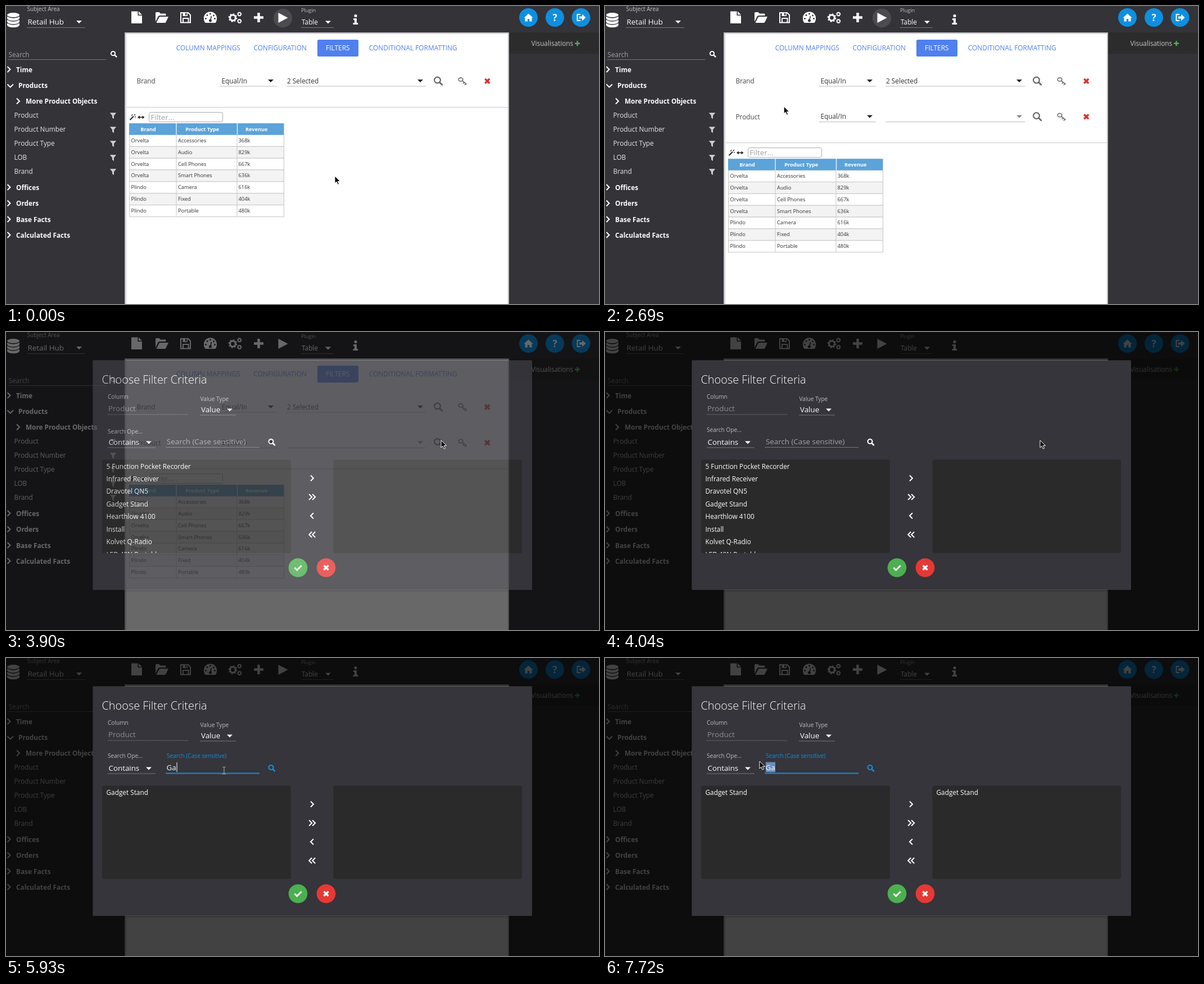
Animation, 1055 px wide and 531 px high, one loop 8000 ms. Source, as an HTML page:

```html
<!DOCTYPE html>
<html lang="en">
<head>
<meta charset="utf-8">
<title>Filter criteria</title>
<style>
html, body { margin: 0; width: 100%; height: 100%; overflow: hidden; background: #333338; }
svg { display: block; width: 100%; height: 100%; }
text { font-family: "Open Sans", sans-serif; white-space: pre; }
</style>
</head>
<body>
<svg id="stage" viewBox="0 0 1055 531" preserveAspectRatio="none"></svg>
<script>
const LOOP = 8000;
const DARK = '#333338', BLUE = '#0f8fe0', TAB = '#4f80ee', INK = '#333';

// Markup helpers
const text = (x, y, s, size = 11.8, fill = '#fff', extra = '') =>
  `<text x="${x}" y="${y}" font-size="${size}" fill="${fill}" ${extra}>${s}</text>`;
const bold = (x, y, s) => text(x, y, s, 11.8, '#fff', 'font-weight="700"');
const rect = (x, y, w, h, fill, extra = '') =>
  `<rect x="${x}" y="${y}" width="${w}" height="${h}" fill="${fill}" ${extra}/>`;
const circle = (x, y, r, fill, extra = '') =>
  `<circle cx="${x}" cy="${y}" r="${r}" fill="${fill}" ${extra}/>`;
const shape = (d, fill = '#fff', extra = '') => `<path d="${d}" fill="${fill}" ${extra}/>`;
const stroke = (d, color = '#fff', w = 2, extra = '') =>
  `<path d="${d}" fill="none" stroke="${color}" stroke-width="${w}" ${extra}/>`;
const rule = (x1, x2, y, color, extra) => stroke(`M${x1} ${y}H${x2}`, color, 1, extra);
const caret = (x, y, fill) => shape(`M${x - 5} ${y - 2.5}h10l-5 5z`, fill);
const lens = (x, y, r, color, w) =>
  circle(x - 1, y - 1, r, 'none', `stroke="${color}" stroke-width="${w}"`) +
  stroke(`M${x + r * .6} ${y + r * .6}l${r * .75} ${r * .75}`, color, w * 1.25, 'stroke-linecap="round"');
const cross = (x, y, r, color, w) =>
  stroke(`M${x - r} ${y - r}l${2 * r} ${2 * r}M${x + r} ${y - r}l${-2 * r} ${2 * r}`, color, w);
const chevron = (x, y, dir = 1, s = 5) =>
  stroke(`M${x - dir * s / 2} ${y - s}l${dir * s} ${s}l${-dir * s} ${s}`, '#fff', 2);
const gear = (x, y, r) =>
  circle(x, y, r, 'none', `stroke="#fff" stroke-width="${r * .62}"`) +
  circle(x, y, r * 1.4, 'none', `stroke="#fff" stroke-width="${r * .4}" stroke-dasharray="${r * .55}"`);

function toolbar() {
  const bands = [18.8, 24.8, 30.8].map(y =>
    shape(`M2 ${y}q11 6 22 0v3.5q-2 4-11 4t-11-4z`)).join('');
  const round = [929.5, 976.5, 1023].map(x => circle(x, 20.5, 16.5, BLUE)).join('');
  return `<ellipse cx="13" cy="16" rx="11" ry="4" fill="#fff"/>` + bands + round +
    text(37.5, 9, 'Subject Area', 10, '#c4c4c6') + text(38.5, 33, 'Retail Hub', 13.4) +
    caret(130, 28.5, '#fff') + rule(37, 141, 38.5, '#77777b') +
    shape('M223 9.5h11.5v7.5h7.5v14h-19zM236 9.5l6 6h-6z') +
    shape('M266 28V12.5q0-1.5 1.5-1.5h5l2.5 2.5h8q1.5 0 1.5 1.5v2h-11q-2 0-3 1.8z') +
    shape('M267.5 30l4.7-9.5q.7-1.5 2.3-1.5h14.5l-4.5 9.5q-.8 1.5-2.5 1.5z') +
    stroke('M311 12h13l4 4v13.5h-17zM315 29v-7h9.5v7') + rect(314.5, 11.5, 8.5, 6.5, '#fff') +
    rect(319, 12.5, 2.5, 4, DARK) +
    shape('M354.5 30q-3-4-2.5-9a11.5 10.7 0 0 1 23 0q.5 5-2.5 9z') +
    [[355.5, 22.5], [358, 16.5], [363.5, 14], [369.5, 17], [371.5, 22.5]]
      .map(([x, y]) => circle(x, y, 1.4, DARK)).join('') +
    stroke('M363.5 26l2-8', DARK, 1.6) + circle(363.5, 26, 2.5, DARK) +
    gear(403.5, 21, 4.9) + gear(415.3, 14.5, 2.6) + gear(415.3, 27, 2.6) +
    stroke('M449.5 12v17M441 20.5h17', '#fff', 4.5) +
    `<g id="playHalo">${circle(492.5, 21.5, 16.7, '#4c4c50')}</g>` +
    shape('M484.5 12l17 9-17 9z') +
    text(525, 10.5, 'Plugin', 9, '#c4c4c6') + text(526, 32.5, 'Table') +
    caret(573, 29, '#fff') + rule(525, 583, 38.5, '#77777b') +
    circle(622, 17.5, 2.6, '#fff') + shape('M618 22h6v8h2.2v3h-8.7v-3h2.5v-5h-2z') +
    shape('M921.5 21l8-7.5 8 7.5h-2v6.5h-4.3v-4.5h-3.4v4.5h-4.3v-6.5z') +
    text(976.5, 26.5, '?', 17, '#fff', 'font-weight="700" text-anchor="middle"') +
    stroke('M1022 15h-5.5v11h5.5', '#fff', 2) + shape('M1020 18.5h5v-4l6.5 6-6.5 6v-4h-5z');
}

function sidebar() {
  const fields = ['Product', 'Product Number', 'Product Type', 'LOB', 'Brand'];
  const groups = [['Time', 113], ['Offices', 323], ['Orders', 351.5], ['Base Facts', 380], ['Calculated Facts', 408]];
  return text(4.5, 90.5, 'Search', 11.8, '#a2a2a5') + rule(4, 178, 95.5, '#77777b') +
    lens(191.5, 85.5, 3.6, '#fff', 2) +
    groups.map(([s, y]) => chevron(5, y) + bold(18, y + 4.5, s)).join('') +
    stroke('M2.5 139.5l5.2 5.2 5.2-5.2') + bold(22, 146, 'Products') +
    chevron(21.5, 169.5) + bold(35, 174, 'More Product Objects') +
    fields.map((s, i) => text(14.5, 198.7 + 25 * i, s, 11.8, '#e8e8e8') +
      shape(`M184.8 ${190.3 + 25 * i}h11.4l-4.2 5v6l-3-2.3v-3.7z`, '#cfcfd0', `id="funnel${i}"`)).join('');
}

function filterRow(y, name, value) {
  return text(232.5, y + 4.5, name, 11.8, '#444') +
    text(383.5, y + 4, 'Equal/In', 11.8, INK) + caret(471, y, '#222') + rule(381, 482, y + 9.5, '#bbb') +
    text(500, y + 4, value, 11.8, INK) + caret(737, y, value ? '#222' : '#888') + rule(499, 747, y + 9.5, '#bbb') +
    lens(768.5, y - .5, 5.4, '#666', 2.2) +
    `<ellipse cx="809" cy="${y - 2.5}" rx="3.8" ry="3.2" fill="none" stroke="#777" stroke-width="1.8"/>` +
    stroke(`M811.5 ${y - .5}l8 6.5M815 ${y + 2.5}l-2 2.5M818 ${y + 5}l-2 2.5`, '#777', 1.8) +
    cross(856.3, y + .3, 4, '#dd2f2b', 3.4);
}

function table() {
  const rows = ['Orvelta|Accessories|368k', 'Orvelta|Audio|829k', 'Orvelta|Cell Phones|667k',
    'Orvelta|Smart Phones|636k', 'Plindo|Camera|616k', 'Plindo|Fixed|404k', 'Plindo|Portable|480k'];
  const cols = [222.5, 306, 413.5], top = 229.5, pitch = 20.85;
  const body = rows.map((row, i) => {
    const y = top + i * pitch;
    return rect(219.5, y, 275, pitch, i % 2 ? '#f3f3f3' : '#fff', 'stroke="#c6c6c6"') +
      row.split('|').map((s, c) => text(cols[c], y + 13.3, s, 9.3, INK)).join('');
  }).join('');
  const heads = [['Brand', 253], ['Product Type', 349.3], ['Revenue', 445.7]];
  return rule(215, 893, 180.5, '#c8c8c8') +
    stroke('M220.5 203l6.5-6.5', '#222', 2) + stroke('M228 195l2-2M224.5 193v2M229 197.5h2M223 195.5h1', '#222', 1.3) +
    stroke('M236 198.3h9', '#222', 1.5) + shape('M234 198.3l4-3v6zM246.5 198.3l-4-3v6z', '#222') +
    rect(254.5, 189.5, 131, 17, '#fff', 'rx="3" stroke="#aaa"') + text(257.5, 203, 'Filter...', 13.3, '#a0a0a0') +
    body + stroke('M303 229.5v146M411 229.5v146', '#c6c6c6', 1) +
    rect(219, 209, 275.5, 20.5, '#5ba3d9') + stroke('M303 209v20.5M411.5 209v20.5', '#fff', 1.2) +
    heads.map(([s, x]) => text(x, 222.7, s, 9.2, '#fff', 'font-weight="700" text-anchor="middle"')).join('');
}

function panel() {
  const tabs = [['COLUMN MAPPINGS', 359.8], ['CONFIGURATION', 487.7], ['FILTERS', 590.3], ['CONDITIONAL FORMATTING', 724.3]];
  return rect(895, 47, 160, 38, '#2c2c2d') + text(934.5, 71, 'Visualisations', 11.8, '#c6c6c6') +
    stroke('M1016.5 62.3v9M1012 66.8h9', '#4caf50', 2.4) +
    rect(211, 47, 684, 490, '#b6b6b9') + rect(212.5, 48.5, 681, 490, '#e2e2e3') + rect(214.5, 50, 678, 490, '#fff') +
    rect(554, 60, 73, 30, TAB, 'rx="2.5"') +
    tabs.map(([s, x]) => text(x, 79.2, s, 11.9, s === 'FILTERS' ? '#fff' : TAB, 'text-anchor="middle"')).join('') +
    filterRow(133.5, 'Brand', '2 Selected') +
    `<g id="newRow">${filterRow(197, 'Product', '')}</g><g id="lower">${table()}</g>`;
}

function dialog() {
  const label = '#bcbcbf';
  // The shade surrounds the dialog and leaves its own area clear.
  return shape('M0 0H1055V531H0zM154.5 50.5V459.5H936V50.5z', '#000', 'opacity=".74" fill-rule="evenodd"') +
    rect(154.5, 50.5, 781.5, 409, '#35353a', 'rx="2" filter="url(#shadow)"') +
    text(170.5, 92, 'Choose Filter Criteria', 19.9, '#fff', 'font-weight="300"') +
    text(181, 119.3, 'Column', 10.1, label) + text(182, 141, 'Product', 13.35, '#8e8e91') +
    rule(181, 325, 147, '#8a8a8d', 'stroke-dasharray="1.5 1.5"') +
    text(345.5, 122.5, 'Value Type', 10.1, label) + text(347, 142.8, 'Value', 13.35) +
    caret(398, 139, '#fff') + rule(345, 409, 148, '#77777b') +
    text(181, 177.5, 'Search Ope...', 10.1, label, 'id="opLabel"') + text(182.5, 201, 'Contains', 13.35) +
    caret(254, 197, '#fff') + rule(181, 266, 206, '#77777b') +
    rect(286, 185.5, 17, 18, '#6b8fba', 'id="selection"') +
    text(286, 199.5, 'Search (Case sensitive)', 13.35, label, 'id="searchLabel"') +
    text(285.5, 199.5, '', 13.35, '#fff', 'id="typed"') +
    rect(303.5, 186, 1, 17, '#fff', 'id="textCaret"') +
    `<path id="searchRule" d="M284 205.5H451"/><g id="lensIdle">${lens(472.5, 196, 4, '#fff', 2.2)}</g>` +
    `<g id="lensActive">${lens(472.5, 196, 4, BLUE, 2.2)}</g>` +
    rect(171, 227.5, 336, 166.5, '#2a2a2a', 'rx="4"') + rect(582.5, 227.5, 335.5, 166.5, '#2a2a2a', 'rx="4"') +
    `<g id="list" clip-path="url(#listClip)"></g>` + `<g id="picked">${text(589.5, 243.5, PICK)}</g>` +
    chevron(544.5, 260.5) + chevron(541.7, 294) + chevron(547.7, 294) +
    chevron(544.5, 327.5, -1) + chevron(541.7, 361, -1) + chevron(547.7, 361, -1) +
    circle(519.5, 420, 16.8, '#4caf50') + stroke('M513.5 420l4.2 4.2 8-8', '#fff', 3) +
    circle(569.5, 420, 16.8, '#e53935') + cross(569.5, 420, 4, '#fff', 3.3);
}

const PICK = 'Gadget Stand';
const ITEMS = ['5 Function Pocket Recorder', 'Infrared Receiver', 'Dravotel QN5', PICK,
  'Hearthlow 4100', 'Install', 'Kolvet Q-Radio', 'LED 42N Portable'];
const listRows = items => items.map((s, i) => text(178.5, 243.5 + 22.45 * i, s)).join('');

const CURSORS = {
  arrow: shape('M0 0v13l3-2.8 2.3 5 2.2-1-2.3-4.8h4.3z', '#000', 'stroke="#fff" stroke-width="1"'),
  hand: shape('M-1.5 1q1.5-2 2.5 0v4l5 1.5q1.5.5 1 2.5l-1 4.5h-6l-4-5.5q.5-1.8 2.5 0z', '#fff', 'stroke="#222" stroke-width=".9"'),
  beam: stroke('M-3-6q2.5 0 3 1.5.5-1.5 3-1.5M0-5v11M-3 7q2.5 0 3-1.5.5 1.5 3 1.5', '#a5a5a5', 1.1)
};

const stage = document.getElementById('stage');
stage.innerHTML = `<defs><clipPath id="listClip">${rect(171, 227.5, 336, 166.5, '#000')}</clipPath>
  <filter id="shadow" x="-5%" y="-5%" width="110%" height="112%">
  <feDropShadow dx="0" dy="1" stdDeviation="1.5" flood-color="#000" flood-opacity=".5"/></filter></defs>` +
  rect(0, 0, 1055, 531, DARK) + toolbar() + sidebar() + panel() +
  `<g id="dialog">${dialog()}</g><g id="cursor">` +
  Object.entries(CURSORS).map(([k, v]) => `<g id="${k}">${v}</g>`).join('') + '</g>';

const $ = id => document.getElementById(id);
const set = (id, attrs) => { for (const k in attrs) $(id).setAttribute(k, attrs[k]); };
const show = (id, on) => set(id, { visibility: on ? 'inherit' : 'hidden' });
const lerp = (a, b, k) => a + (b - a) * k;
const clamp = v => Math.min(1, Math.max(0, v));

// Keys are [time, ...values]; interpolated linearly.
function at(keys, t) {
  const i = keys.findIndex(k => k[0] > t);
  if (i < 0) return keys[keys.length - 1].slice(1);
  if (i === 0) return keys[0].slice(1);
  const a = keys[i - 1], b = keys[i], k = (t - a[0]) / (b[0] - a[0]);
  return a.slice(1).map((v, j) => lerp(v, b[j + 1], k));
}

const PATH = [
  [322, 585, 303], [620, 510, 285], [1214, 137, 218], [1510, 186, 195], [1654, 189, 195], [1949, 190, 195],
  [2400, 190, 195], [2850, 390, 170], [3280, 690, 182], [3570, 779, 195], [3724, 778, 194],
  [3872, 774, 193], [4100, 774, 193], [4460, 540, 196], [4740, 388, 200], [6090, 388, 200],
  [6380, 260, 238], [6680, 177, 247], [6830, 190, 244], [7270, 306, 197], [7420, 306, 197], [7717, 275, 184]];
const FADE = [[3724, 0], [3872, .8], [4020, 1]];
const HALO = [[3570, 1], [3724, .4], [3872, 0]];

const hold = t => t < 456 ? 0 : 470 + 147.9 * Math.floor((t - 456) / 147.9);

let listed = null;
function draw(time) {
  const t = hold(time);
  const added = t >= 2200, open = t > 3724;
  const focus = (t >= 4800 && t < 6500) || t >= 7560;

  set('playHalo', { opacity: at(HALO, t)[0] });
  set('funnel0', { fill: t > 1600 && t < 2500 ? '#59595d' : '#cfcfd0' });
  show('newRow', added);
  set('lower', { transform: `translate(0 ${added ? 63.2 : 0})` });
  set('dialog', { opacity: at(FADE, t)[0], visibility: open ? 'visible' : 'hidden' });
  set('opLabel', { y: lerp(180.8, 177.5, clamp((t - 3872) / 148)) });

  const float = clamp((t - 4800) / 300);
  set('searchLabel', {
    y: lerp(199.5, 177.5, float), 'font-size': lerp(13.35, 10.1, float),
    fill: focus ? BLUE : float ? '#bcbcbf' : '#a2a2a5'
  });
  const word = 'Ga'.slice(0, t < 5400 ? 0 : t < 5600 ? 1 : 2);
  $('typed').textContent = word;
  set('textCaret', { x: [286, 296, 303.5][word.length] });
  show('textCaret', focus && t < 7000);
  show('selection', t >= 7560);
  set('searchRule', { stroke: focus ? BLUE : '#77777b', 'stroke-width': focus ? 2 : 1 });
  show('lensIdle', !focus);
  show('lensActive', focus);
  show('picked', t >= 6800);

  const query = t >= 5920 ? word : '';
  if (query !== listed) {
    listed = query;
    $('list').innerHTML = listRows(ITEMS.filter(s => s.includes(query)));
  }

  const [x, y] = at(PATH, t);
  const overField = t > 4100 && x > 284 && x < 451 && y > 185 && y < 207;
  const kind = overField ? 'beam' : t > 1600 && t < 2500 ? 'hand' : 'arrow';
  for (const k in CURSORS) show(k, k === kind);
  set('cursor', { transform: `translate(${x} ${y})` });
}

const start = performance.now();
function tick() {
  draw((performance.now() - start) % LOOP);
  requestAnimationFrame(tick);
}
tick();
</script>
</body>
</html>
```
